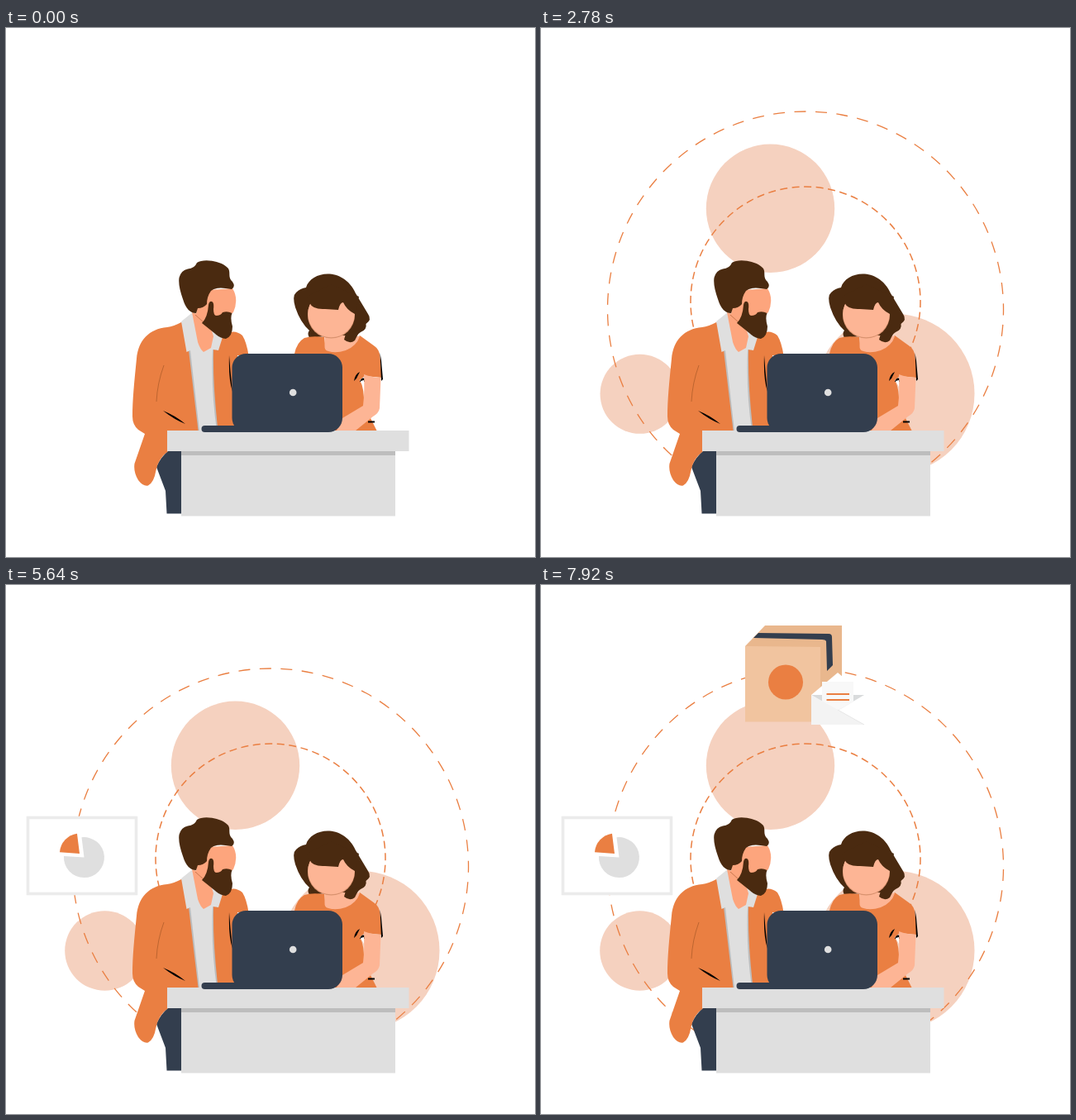
These frames come from a looping animation (640x640 px, 8000 ms). An HTML page:

```html
<!DOCTYPE html>
<html lang="en">
<head>
<meta charset="utf-8">
<title>Office teamwork</title>
<style>
html, body { margin: 0; width: 100%; height: 100%; overflow: hidden; background: #fff; }
svg { display: block; width: 100vw; height: 100vh; }
.orange { fill: #ea7f42; }
.navy { fill: #333e4e; }
.hair { fill: #4a2a10; }
.grey { fill: #dfdfdf; }
.skin { fill: #fda57d; }
.pale { fill: #fdb595; }
.ring { fill: none; stroke: #ea7f42; }
.blob { fill: #f5d1bf; }
</style>
</head>
<body>
<svg viewBox="0 0 640 640">
  <circle class="blob" id="blobTop" cx="277.5" cy="218.3" r="77.7"/>
  <circle class="blob" id="blobLeft" cx="119.5" cy="442.5" r="48.3"/>
  <circle class="blob" id="blobRight" cx="428" cy="442.3" r="96.5"/>
  <circle class="ring" id="outerRing" r="239.5" stroke-width="1.3" pathLength="59" stroke-dasharray=".55 .45"/>
  <circle class="ring" id="innerRing" r="139" stroke-width="1.5" pathLength="60" stroke-dasharray=".62 .38"/>

  <g id="card">
    <rect x="26.5" y="281.5" width="131" height="92" fill="#fff" stroke="#ebebeb" stroke-width="3.6"/>
  </g>
  <g id="pie">
    <path class="grey" d="M94.500 329.500L91.500 305.300A24.500 24.500 0 1 1 70 328Z"/>
    <path class="orange" d="M89 325L86 300.800A24.400 24.400 0 0 0 65 323.300Z"/>
  </g>

  <g id="parcel">
    <path fill="#e9b78d" d="M247 74L271 49H364V140L338 165.500Z"/>
    <path fill="#f1c49f" d="M247 74L338 75V165.500H247Z"/>
    <path class="navy" d="M257 64L263 58L348 59Q352 59 352 63L353 97L346 104L345 68Q344 66 340 66Z"/>
    <circle class="orange" cx="296" cy="117.500" r="21"/>
  </g>
  <g id="letter">
    <path fill="#fff" d="M327 133L359 106L391 133V169H327Z"/>
    <path fill="#d9dbdc" d="M327 133H391L359 152Z"/>
    <path fill="#f8f8f8" d="M340 117H378V141L359 152L340 141Z"/>
    <path stroke="#ea7f42" stroke-width="1.8" d="M345.500 132H373M345.500 139H373"/>
    <path fill="#f3f3f3" d="M327 133L391 169H327Z"/>
    <path fill="none" stroke="#e3e3e3" stroke-width=".8" d="M359 151L391 169"/>
  </g>

  <g id="man">
    <path class="navy" d="M197 511H214V587.500H194.500L193 560L182 531Q187 519 197 511Z"/>
    <path class="orange" d="M212 356Q203 361 195 362C173 364 160 378 158 400C155 430 153 450 153 470Q153 480 160 486L168 491L155.500 527Q154 537 160 547Q166 555 172 553.500Q179 550 181.500 535Q184 521 196 512H280V396H293.500Q291 380 286 372Q279 366 271 368L258 374Z"/>
    <path fill="#bdbdbd" d="M221 390L226 388L237 487H232.500ZM248 388L251 389Q250 430 256.500 487H250Z"/>
    <path class="grey" d="M212 355L227 343L262 374L257 390L250 389Q248 440 255 487H234L223 390L218.500 392Z"/>
    <path class="skin" d="M225 344L232 380Q235 389 239 392L248 387L251 373L244 350Z"/>
    <path class="skin" d="M245 317L274 315Q282 328 275 344L264 352L244 358L230 346L231 337Z"/>
    <path fill="none" stroke="#c9764e" stroke-width="1" d="M229 347L239 356"/>
    <path class="hair" d="M231 284C239 278 262 282 269 291C272 296 268 302 274 307Q278 313 273 316Q254 312 248 318Q243 325 243 334Q239 339 232 339L230 345Q219 345 214 328Q208 311 209.500 302Q212 293 220 291.500Q228 291 231 284Z"/>
    <path class="hair" d="M245 335Q246 330 249 331Q252 332 251 340Q251 347 254 348Q260 348 262 344Q268 342 273.500 345Q271 351 274 361Q274 373 266 376Q259 376 252 369L237 357Q244 350 245 335Z"/>
    <path fill="none" stroke="#bd6530" stroke-width="1" d="M191 408Q183 430 182 452"/>
    <path d="M190 463Q205 469 217 479Q204 474 190 463ZM270 396L271.500 415L274 440Q269 425 270 396Z"/>
  </g>

  <g id="woman">
    <path class="hair" d="M363 314C369 294 408 288 423 321L438 346Q443 353 435.500 358Q437 365 429 368Q424 371 422 378Q416 383 409 377L386 373L367 375Q364 369 367 366Q356 356 350 338Q346 324 351 320Q356 315 363 314Z"/>
    <path class="orange" d="M349 394Q352 380 361 375Q370 372 385 374L387 389Q400 394 414 388L428 372L446 385Q452 389 452.500 398L455 423L434 421L428 426Q434 436 433 458L441 472L449 488H349Z"/>
    <path d="M452.500 393L454 402L456 425L454 427ZM421 427Q422 419 428 416L424 424ZM428 428Q430 422 434 424L434 428ZM438 475.500H446V477.500H438Z"/>
    <path fill="#fff" d="M429 427L433 426V434Z"/>
    <path class="pale" d="M385.500 372H412L428 373Q424 385 411 390Q399 394 390 391Q385 390 385.500 384Z"/>
    <path class="hair" d="M411 370L428 366L422 378Q416 383 409 377Z"/>
    <circle cx="393.500" cy="347" r="28.500" fill="#d9926f"/>
    <circle class="pale" cx="393.500" cy="346" r="28.300"/>
    <path class="hair" d="M367 332Q371 341 386 340L402 341Q404 332 408 332Q412 341 422 346L427 325L393 310L364 325Z"/>
    <path class="pale" d="M433 419Q443 423 453.500 423L452 460Q451 466 444 470L423 487H400L407 472L432 457Q434 440 433 419Z"/>
  </g>

  <g id="desk">
    <path class="grey" d="M195 487H487.500V512H471V590.500H212V512H195Z"/>
    <rect x="212" y="512" width="259" height="5" fill="#bdbdbd"/>
    <rect class="navy" x="236.500" y="481" width="70" height="8" rx="4"/>
    <rect class="navy" x="273.500" y="394" width="133.500" height="95" rx="17"/>
    <circle class="grey" cx="347.200" cy="441" r="4.300"/>
  </g>
</svg>
<script>
const LOOP = 8000;
const get = id => document.getElementById(id);
const clamp = v => Math.min(1, Math.max(0, v));
const inOut = p => p < .5 ? 4 * p ** 3 : 1 - 4 * (1 - p) ** 3;

// Grows from nothing past full size, then settles at 1.
function pop(t, start, peak) {
  const rise = inOut(clamp((t - start) / 745));
  const settle = inOut(clamp((t - start - 745) / 230));
  return rise * peak + settle * (1 - peak);
}

function setTransform(id, visible, value) {
  const node = get(id);
  node.style.display = visible ? '' : 'none';
  node.setAttribute('transform', value);
}

function scaleAbout(id, x, y, scale) {
  setTransform(id, scale > .001, `translate(${x} ${y}) scale(${scale}) translate(${-x} ${-y})`);
}

function spinRing(id, y, scale, angle) {
  setTransform(id, scale > .001, `translate(320 ${y}) rotate(${angle}) scale(${scale})`);
}

function growBlob(id, x, y, t, start, duration, power) {
  scaleAbout(id, x, y, 1 - (1 - clamp((t - start) / duration)) ** power);
}

function draw(now) {
  const t = now % LOOP;
  growBlob('blobTop', 320, 318.5, t, 570, 2050, 2);
  growBlob('blobLeft', 145.5, 505, t, 500, 2500, 2.2);
  growBlob('blobRight', 481, 565.5, t, 600, 2000, 2);
  spinRing('outerRing', 340.5, pop(t, 500, 1.167), -7.4 + .00643 * t);
  spinRing('innerRing', 331, pop(t, 600, 1.173), 12.7 - .007 * t);
  scaleAbout('card', 92, 327.5, pop(t, 4285, 1.055));
  scaleAbout('pie', 92, 327.5, pop(t, 4665, 1.055));
  const parcelScale = pop(t, 6520, 1.05);
  scaleAbout('parcel', 305.5, 107.5, parcelScale);
  scaleAbout('letter', 359, 139, parcelScale);
  requestAnimationFrame(() => draw(performance.now() - begin));
}

const begin = performance.now();
draw(0);
</script>
</body>
</html>
```
